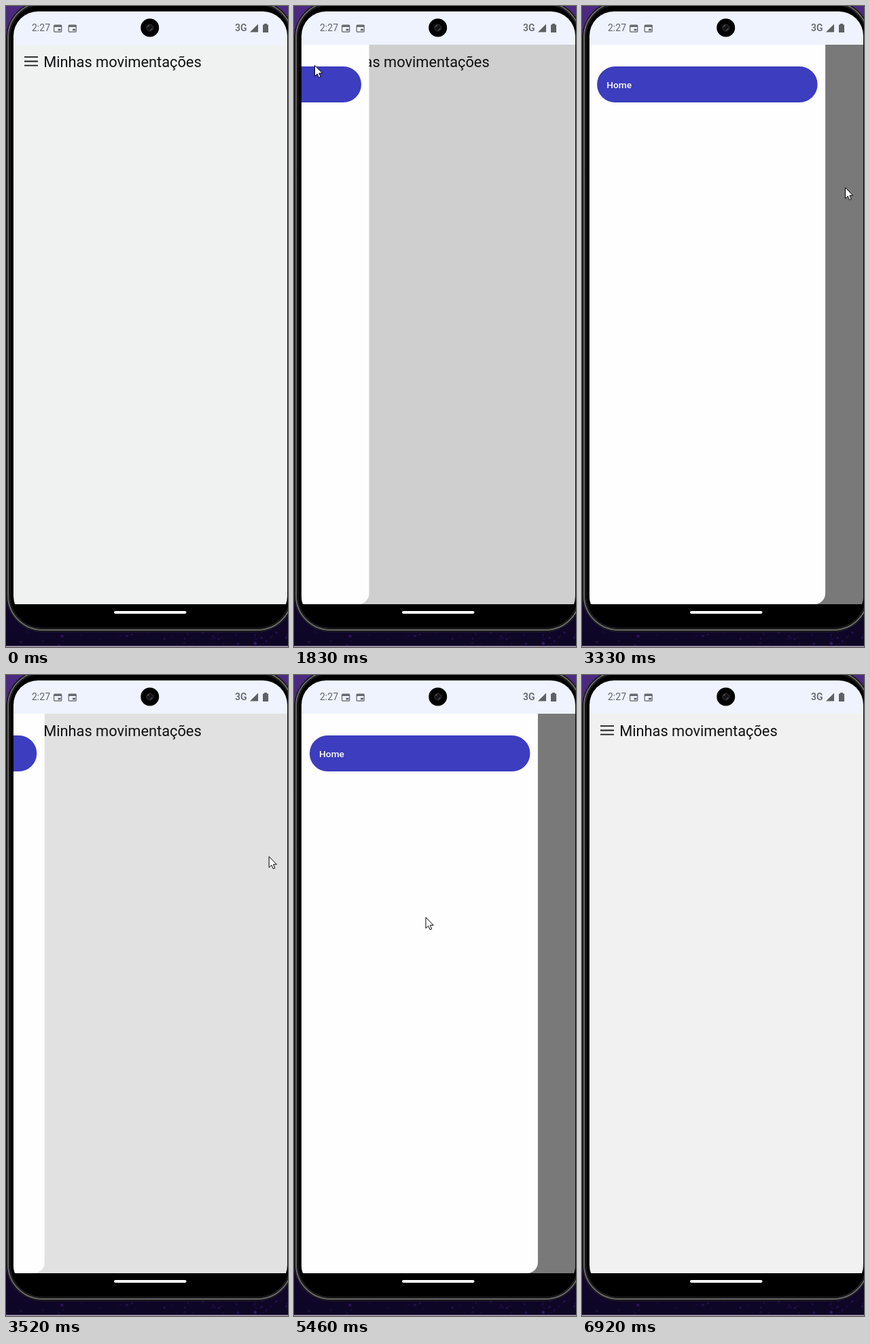
Write an HTML page that moves like this. It is 415 px wide and 944 px high and loops after 7.85 s.

```html
<!DOCTYPE html>
<html lang="pt">
<head>
<meta charset="utf-8">
<style>
  html, body { margin: 0; width: 100%; height: 100%; overflow: hidden; background: #0d0624; }
  svg { display: block; width: 415px; height: 944px; }
  text { font-family: Roboto, sans-serif; }
</style>
</head>
<body>
<svg viewBox="0 0 415 944">
  <defs>
    <linearGradient id="wall" x2="0" y2="1">
      <stop offset="0" stop-color="#4c2a80"/>
      <stop offset=".5" stop-color="#2a1450"/>
      <stop offset=".96" stop-color="#10062a"/>
      <stop offset="1" stop-color="#0d0624"/>
    </linearGradient>
    <clipPath id="screen"><rect x="11" y="8" width="403" height="897" rx="36"/></clipPath>
    <clipPath id="content"><rect x="11" y="57" width="403" height="824"/></clipPath>
    <g id="calendar" fill="none" stroke="#5f6063">
      <rect x=".7" y=".7" width="11" height="10" rx="1" stroke-width="1.2"/>
      <path d="M.5 2.2h11.4" stroke-width="2.4"/>
      <path d="M6.5 7.5h4" stroke-width="2.6"/>
    </g>
  </defs>

  <rect width="415" height="944" fill="url(#wall)"/>
  <g id="specks" fill="#3a1a6b"></g>
  <rect y="942.5" width="415" height="1.5" fill="#b9a9c4"/>

  <!-- phone body -->
  <rect x=".5" y="-7.5" width="423" height="929" rx="54" fill="#000" stroke="#2b2b2b"/>
  <rect x="3" y="-5" width="418" height="924" rx="51" fill="none" stroke="#6d6d6d" stroke-width="2"/>
  <rect x="5.5" y="-2.5" width="413" height="919" rx="48" fill="none" stroke="#1d1d1d" stroke-width="2"/>

  <g clip-path="url(#screen)">
    <rect x="11" y="8" width="403" height="49" fill="#eef3fe"/>
    <g clip-path="url(#content)">
      <rect id="page" x="11" y="57" width="403" height="824"/>
      <path id="menu" d="M27 75.2h20M27 81.5h20M27 87.7h20" stroke="#1a1a1c" stroke-width="1.8"/>
      <text x="55.2" y="90" font-size="21.8" fill="#111113">Minhas movimentações</text>
      <rect id="shade" x="11" y="57" width="403" height="824"/>
      <g id="drawer">
        <rect x="11" y="20" width="348" height="861" rx="16" fill="#fefefe"/>
        <rect x="11" y="20" width="30" height="861" fill="#fefefe"/>
        <rect x="23" y="89" width="324.500" height="53" rx="26.500" fill="#3c3dbf"/>
        <text x="37.200" y="121" font-size="13.700" font-weight="500" fill="#fff">Home</text>
      </g>
    </g>
    <rect x="11" y="881" width="403" height="30"/>
  </g>
  <rect x="159" y="891" width="106.500" height="4" rx="2" fill="#fff"/>

  <!-- status bar -->
  <g fill="#5f6063" font-size="14">
    <text x="38" y="37">2:27</text>
    <use href="#calendar" x="70" y="27.500"/>
    <use href="#calendar" x="91.500" y="27.500"/>
    <text x="337" y="37" font-weight="500">3G</text>
    <path d="M359 38.500L371 26.500V38.500z"/>
    <path d="M380 26h4v1.500h2V39h-8V27.500h2z"/>
  </g>
  <circle cx="211.700" cy="32" r="13.500"/>
  <circle cx="211.700" cy="32" r="5" fill="#151517" stroke="#38383a"/>
  <path d="M208.500 31a3.500 3.500 0 0 1 2.500-2.500M215 33a3.500 3.500 0 0 1-2.500 2.500" fill="none" stroke="#77777a"/>

  <g id="cursor">
    <circle id="halo" r="12" fill="#ff0" fill-opacity=".47"/>
    <path d="M.5.500V16.500L4.200 13L6.700 18.500L9.200 17.400L6.800 12H11.700z" fill="#fff" stroke="#000"/>
  </g>
</svg>
<script>
const LOOP = 7850, DRAWER_WIDTH = 348, STIFFNESS = 18.26;
const $ = id => document.getElementById(id);

// Pointer stops: time, x, y
const path = [
  [70, 399, 922], [800, 169, 235], [1560, 30, 87], [1950, 30, 87],
  [2440, 109, 246], [3100, 387, 267], [3520, 387, 267], [4050, 166, 237],
  [4680, 34, 85], [5030, 34, 85], [5930, 367, 652], [6250, 367, 652],
  [6510, 385, 767], [6860, 400, 898]
];
// Each tap: press, release, start of the drawer's move, and where it goes
const taps = [
  { down: 1600, up: 1690, start: 1773, open: 1 },
  { down: 3100, up: 3190, start: 3327, open: 0 },
  { down: 4700, up: 4790, start: 4859, open: 1 },
  { down: 5930, up: 6030, start: 6115, open: 0 }
];

function pointerAt(t) {
  const i = path.findIndex(p => p[0] > t);
  if (i < 1) return path[i < 0 ? path.length - 1 : 0].slice(1);
  const [t0, x0, y0] = path[i - 1], [t1, x1, y1] = path[i];
  const k = (t - t0) / (t1 - t0);
  return [x0 + (x1 - x0) * k, y0 + (y1 - y0) * k];
}

// Critically damped spring
function drawerAt(t) {
  const tap = taps.filter(p => p.start <= t).pop();
  if (!tap) return 0;
  const x = STIFFNESS * (t - tap.start) / 1000;
  const rest = Math.exp(-x) * (1 + x);
  return tap.open ? 1 - rest : rest;
}

function draw(t) {
  const open = drawerAt(t);
  $('drawer').setAttribute('transform', `translate(${(open - 1) * DRAWER_WIDTH})`);
  $('shade').setAttribute('opacity', open / 2);
  $('page').setAttribute('fill', t < taps[0].start ? '#f0f2f1' : '#f1f1f1');
  const pressed = taps.some(p => p.open && t >= p.up && t < p.start + 60);
  $('menu').setAttribute('opacity', pressed ? 0.3 : 1);

  const [x, y] = pointerAt(t);
  $('cursor').setAttribute('transform', `translate(${x} ${y})`);
  $('cursor').style.display = t >= 70 && t < 6920 ? '' : 'none';
  $('halo').style.display = taps.some(p => t >= p.down && t < p.up) ? '' : 'none';
}

let seed = 7;
const random = () => (seed = seed * 16807 % 2147483647) / 2147483647;
for (let i = 0; i < 60; i++) {
  const dot = document.createElementNS('http://www.w3.org/2000/svg', 'circle');
  dot.setAttribute('cx', random() * 415);
  dot.setAttribute('cy', 922 + random() * 19);
  dot.setAttribute('r', 0.5 + random() * 1.8);
  dot.setAttribute('opacity', 0.2 + random() * 0.5);
  $('specks').append(dot);
}

const begin = performance.now();
function tick() {
  draw((performance.now() - begin) % LOOP);
  requestAnimationFrame(tick);
}
tick();
</script>
</body>
</html>
```
